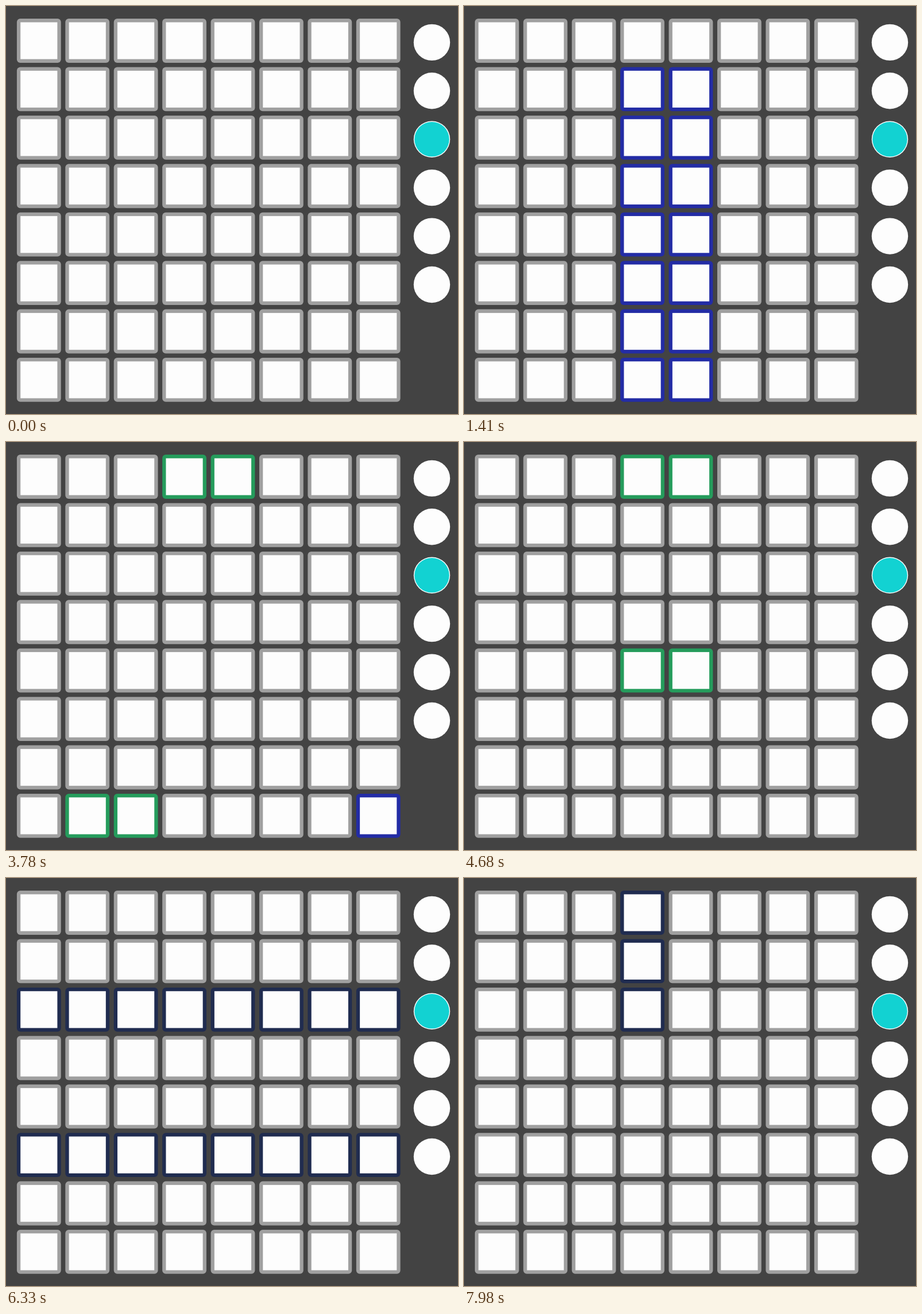
Write an HTML page that moves like this. It is 787 px wide and 711 px high and loops after 8000 ms.

```html
<!DOCTYPE html>
<html lang="en">
<head>
<meta charset="utf-8">
<title>Light pad</title>
<style>
  html, body { margin: 0; width: 100%; height: 100%; overflow: hidden; background: #434343; }
  svg { display: block; width: 100vw; height: 100vh; }
</style>
</head>
<body>
<svg id="pad" viewBox="0 0 787 711"></svg>
<script>
const LOOP = 8000, N = 8, PITCH = 84.42, SIZE = 76.8, EDGE = 6.3;
const GREY = '#a0a0a0', WHITE = '#fdfdfd', BLUE = '#232ca5', GREEN = '#259c5c',
      RED = '#a22c24', NAVY = '#202c50';
const RIPPLE = ['#2224a8', '#2224a8', '#203c24', '#203c24', '#614a22', RED, RED, '#4f2430', '#4f2430'];
const pad = document.getElementById('pad');

function add(tag, attrs) {
  const el = document.createElementNS('http://www.w3.org/2000/svg', tag);
  for (const k in attrs) el.setAttribute(k, attrs[k]);
  pad.appendChild(el);
  return el;
}

const cells = [];
for (let r = 0; r < N; r++) {
  for (let c = 0; c < N; c++) {
    const x = 18.9 + c * PITCH, y = 22.1 + r * PITCH, inner = SIZE - 2 * EDGE;
    const rim = add('rect', { x, y, width: SIZE, height: SIZE, rx: 6, fill: GREY });
    add('rect', { x: x + EDGE, y: y + EDGE, width: inner, height: inner, fill: WHITE });
    cells.push({ r, c, rim, color: GREY });
  }
}
for (let i = 0; i < 6; i++) {
  const cx = 741.5, cy = 63.4 + i * PITCH;
  add('circle', { cx, cy, r: 31.7, fill: WHITE });
  if (i === 2) add('circle', { cx, cy, r: 30.3, fill: '#12d2d2' });
}

const stepAt = (t, start, len) => Math.floor((t - start) / len);
const within = (t, a, b) => t >= a && t < b;
const mid = i => i === 3 || i === 4;
const ring = i => Math.floor(Math.abs(i - 3.5));   // 0 in the middle, 3 at the rim

// Diamond wave running outward through a sequence of colours.
function ripple(t, start, r, c) {
  let delay = Math.abs(r - 3.5) + Math.abs(c - 3.5) - 1;
  if (r === 6 && ring(c) === 3) delay++;
  return RIPPLE[stepAt(t, start, 52) - delay];
}

// Two-cell runner along a path; its last cell stays lit.
function runner(t, start, len, pos, last) {
  const head = stepAt(t, start, len);
  return head === pos || head === pos + 1 || (pos === last && head > last);
}

// Position along the left edge upward, then along the top to the middle.
function climb(r, c) {
  if (c === 0) return 7 - r;
  return r === 0 && c <= 3 ? 7 + c : -9;
}

function bars(t, r, c) {
  if (within(t, 840, 1140)) return ring(c) === 3 && 7 - r <= stepAt(t, 840, 42);
  if (within(t, 1140, 1500)) return mid(c) && 7 - r <= stepAt(t, 1140, 44);
  if (within(t, 1500, 1590)) return ring(c) === 1;
  return within(t, 1590, 1650) && ring(c) === 2;
}

function edges(t, r, c) {
  if (t >= 4500) return false;
  if (r === 0 || c === 0) {
    const p = climb(r, c);
    if (p >= 0 && runner(t, 2760, 51, p, 10)) return true;
  }
  if (r === 0 && c > 3 && runner(t, 3420, 42, 7 - c, 3)) return true;
  if (r === 7 && c <= 3 && runner(t, 3690, 45, c, 3)) return true;
  return r === 7 && c > 3 && runner(t, 4050, 42, 7 - c, 3);
}

function inward(t, r, c) {
  if (!mid(c) || t >= 5010) return false;
  return r > 3 ? runner(t, 4380, 40, 7 - r, 3) : runner(t, 4680, 45, r, 3);
}

function cross(t, r, c) {
  if (!mid(r) || !within(t, 5010, 5460)) return false;
  if (c > 3) return stepAt(t, 5010, 38) === c - 4;
  return t < 5310 ? c === 3 : stepAt(t, 5310, 38) === 3 - c;
}

function diagonal(t, r, c) {
  if (!within(t, 6465, 7050)) return false;
  const lag = stepAt(t, 6465, 36) - r - c;
  return lag === 0 || lag === 1 || (lag > 1 && ring(r) === 3);
}

function sweeps(t, r, c) {
  return stepAt(t, 5640, 37.5) === ring(r)
    || stepAt(t, 5940, 37.5) === ring(c)
    || stepAt(t, 6270, 40) === ring(r)
    || diagonal(t, r, c)
    || stepAt(t, 7230, 37.5) === r - 4 && r > 3
    || within(t, 7560, 7885) && ring(c) === 2 && r <= stepAt(t, 7560, 40)
    || c === 3 && r <= stepAt(t, 7885, 45);
}

function colorAt(t, r, c) {
  if (t < 820) return ripple(t, 25, r, c) || GREY;
  if (within(t, 1790, 2760)) {
    const hit = ripple(t, 1795, r, c);
    if (hit) return hit;
    if (r === 1 && c === 7 && within(t, 2400, 2610)) return BLUE;
  }
  if (r === 7 && c === 7 && within(t, 2107, 4050)) return BLUE;
  if (bars(t, r, c)) return BLUE;
  if (edges(t, r, c) || inward(t, r, c)) return GREEN;
  if (cross(t, r, c)) return RED;
  return sweeps(t, r, c) ? NAVY : GREY;
}

function draw(t) {
  for (const cell of cells) {
    const color = colorAt(t, cell.r, cell.c);
    if (color !== cell.color) cell.rim.setAttribute('fill', cell.color = color);
  }
}

const begin = performance.now();
function frame() {
  draw((performance.now() - begin) % LOOP);
  requestAnimationFrame(frame);
}
draw(0);
requestAnimationFrame(frame);
</script>
</body>
</html>
```
